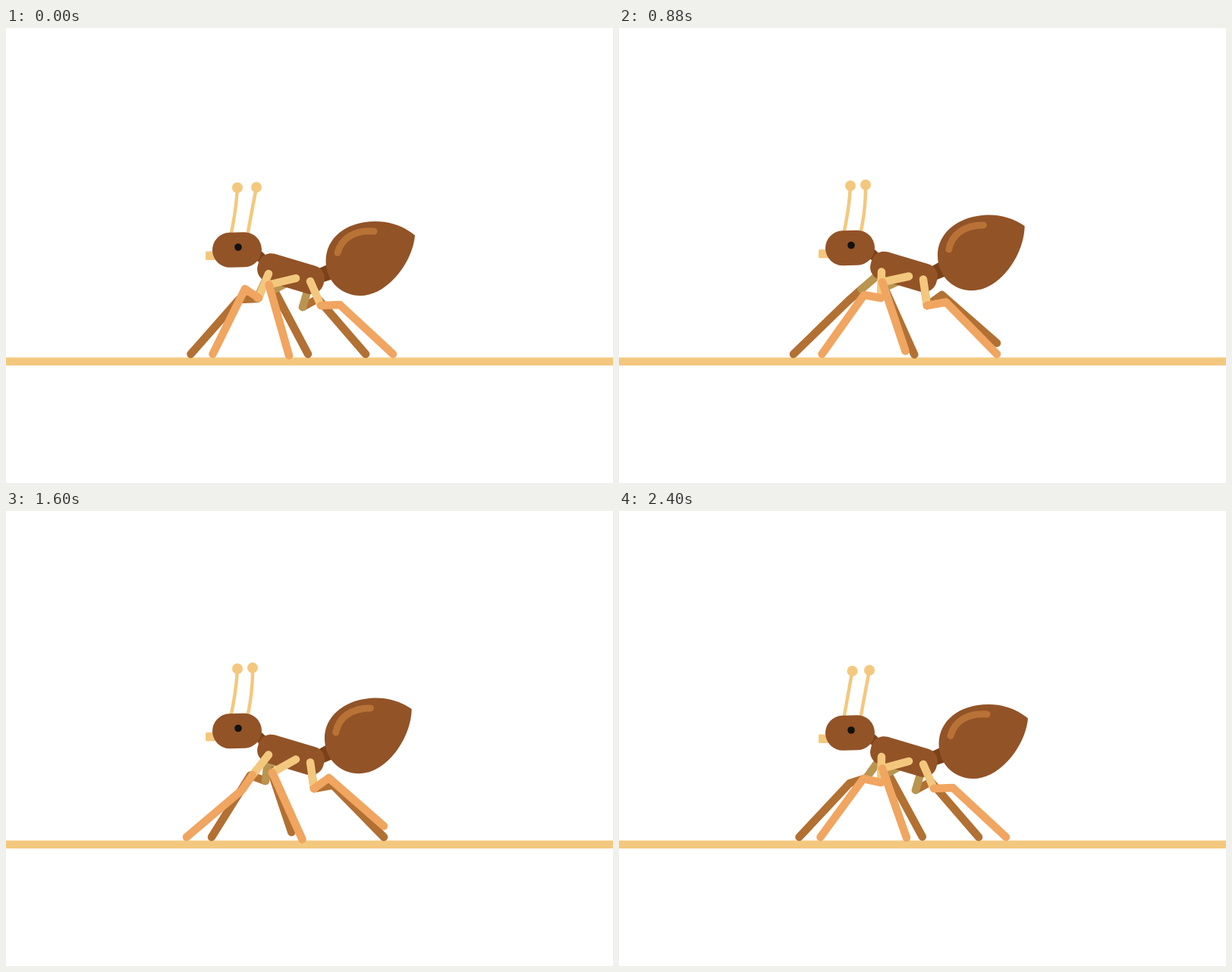
These frames come from a looping animation (800x600 px, 2440 ms). An HTML page:

```html
<!DOCTYPE html>
<html lang="en">
<head>
<meta charset="utf-8">
<title>Walking ant</title>
<style>
  html, body { margin: 0; width: 100%; height: 100%; overflow: hidden; background: #fff; }
  svg { display: block; width: 800px; height: 600px; }
  .limb { fill: none; stroke-width: 10.5; stroke-linecap: round; stroke-linejoin: round; }
  .feeler { fill: none; stroke: #f3c87e; stroke-width: 4.5; }
</style>
</head>
<body>
<svg viewBox="0 0 800 600">
  <rect y="434.5" width="800" height="10.5" fill="#f3c87e"/>
  <g id="far"></g>
  <g id="body">
    <path d="M329 296 L346 312" stroke="#7a4218" stroke-width="13"/>
    <g id="tail">
      <path d="M404 321 L432 308 L434 330 L409 338Z" fill="#7a4218"/>
      <path d="M539 273.5C527 263 508 255 487 255C448 255 421.5 277 421.5 307C421.5 334 442 353 467 353C500 353 535 313 539 273.5Z" fill="#925327"/>
      <path class="limb" d="M437 296.5C442 277 460 266 485 268" stroke="#b97236" style="stroke-width:9"/>
    </g>
    <rect x="330.5" y="305" width="90" height="38" rx="17" fill="#925327" transform="rotate(16.5 375.5 324)"/>
    <rect x="263" y="294.5" width="14" height="11.5" rx="1.5" fill="#f3c87e"/>
    <g id="feelers"></g>
    <rect x="272" y="269.5" width="65" height="46" rx="23" fill="#925327" transform="rotate(-1.5 304.5 292.5)"/>
    <circle cx="306" cy="289" r="4.8" fill="#111"/>
  </g>
  <g id="near"></g>
</svg>
<script>
const LOOP = 2440, STEP = 40, CYCLE = 12;
const PHASES = [0, 4, 6, 10];   // steps of the walk cycle at which poses are given
const FRONT = [346, 324], MID = [382, 330], HIND = [401, 334];

// Each pose lists the joints after the hip as x, y pairs.
const midWalk = [
  [347, 339.5, 379, 431], [351, 345, 390.5, 433],
  [355.5, 348, 401, 432], [347, 335, 377.5, 426]
];
const hindWalk = [
  [415, 366, 440, 365, 510, 430], [406, 366, 425.5, 352, 498, 415.5],
  [391, 368, 411, 357, 474, 430], [406, 366, 431, 361.5, 498, 430]
];
const frontNear = [
  [345, 358, 322, 353, 265.5, 430], [325, 348, 311, 368, 238, 430],
  [331, 355, 312, 362, 244, 430], [345, 356, 323, 352, 267.5, 430]
];
const frontFar = [
  [326, 352, 304, 359, 237.5, 430], [342, 356, 322, 348.5, 271, 430],
  [342, 355, 321, 350, 269, 430], [319.5, 344.5, 301, 361, 230, 430]
];

const $ = id => document.getElementById(id);
function add(parent, tag, attrs) {
  const el = document.createElementNS('http://www.w3.org/2000/svg', tag);
  for (const k in attrs) el.setAttribute(k, attrs[k]);
  return parent.appendChild(el);
}
const mix = (a, b, w) => a.map((v, i) => v + (b[i] - v) * w);

// Periodic cubic through the four poses.
function walk(poses, step) {
  const p = step % CYCLE;
  const i = p < 4 ? 0 : p < 6 ? 1 : p < 10 ? 2 : 3;
  const gap = i % 2 ? 2 : 4, u = (p - PHASES[i]) / gap;
  const [a, b, c, d] = [3, 0, 1, 2].map(k => poses[(i + k) % 4]);
  return b.map((v, k) => {
    const m0 = (c[k] - a[k]) / 6 * gap, m1 = (d[k] - v) / 6 * gap;
    return v + m0 * u + (3 * (c[k] - v) - 2 * m0 - m1) * u * u
      + (2 * (v - c[k]) + m0 + m1) * u * u * u;
  });
}

// start: pose the leg sets off from when the loop begins
function leg(side, hip, poses, { shift = 0, dx = 0, dy = 0, start } = {}) {
  const near = side === 'near', g = $(side);
  const limb = color => add(g, 'path', { class: 'limb', stroke: color });
  let thigh, shin;
  if (near) {
    thigh = limb('#f3c87e');
    shin = limb('#f0a560');
  } else {
    shin = limb('#b27033');
    thigh = limb('#b99550');
  }
  return (step, lift, settle) => {
    let pts = walk(poses, step + shift).map((v, i) => v + (i % 2 ? dy : dx));
    if (start) pts = mix(pts, start, settle);
    thigh.setAttribute('d', `M${hip[0]} ${hip[1] + lift}L${pts[0]} ${pts[1]}`);
    shin.setAttribute('d', 'M' + pts.join(' '));
  };
}

function feeler(rest, bent) {
  const line = add($('feelers'), 'path', { class: 'feeler' });
  const knob = add($('feelers'), 'circle', { r: 7, fill: '#f3c87e' });
  return bend => {
    const [x, y, cx, cy, tx, ty] = mix(rest, bent, bend);
    line.setAttribute('d', `M${x} ${y}Q${cx} ${cy} ${tx} ${ty}`);
    knob.setAttribute('cx', tx);
    knob.setAttribute('cy', ty);
  };
}

const legs = [
  leg('far', HIND, hindWalk, { shift: 6 }),
  leg('far', MID, midWalk, { shift: 6, dx: -1.2, dy: -2.4, start: [353, 345, 398, 430] }),
  leg('far', FRONT, frontFar, { start: [331, 357, 307, 358, 243.5, 430] }),
  leg('near', FRONT, frontNear, { start: [333, 356, 315, 344, 272.5, 430] }),
  leg('near', HIND, hindWalk),
  leg('near', MID, midWalk, { start: [346.5, 338.5, 373, 432] })
];
const left = feeler([296.5, 272, 302, 241, 307.5, 211], [296.5, 272, 303.5, 240, 305, 210.5]);
const right = feeler([318.5, 272, 324, 241, 330, 210], [318.5, 272, 325.5, 240, 325, 209.3]);

function draw() {
  const step = Math.floor(performance.now() % LOOP / STEP);
  const bob = (1 - Math.cos(step * Math.PI / 3)) / 1.5;
  const lift = -2.5 * bob;
  const settle = Math.max(0, 1 - step / 3);
  $('body').setAttribute('transform', `translate(0 ${lift})`);
  $('tail').setAttribute('transform', `rotate(${-4.4 * bob} 410 325)`);
  left(bob + (1 - bob) * settle);
  right(bob);
  for (const move of legs) move(step, lift, settle);
  requestAnimationFrame(draw);
}
draw();
</script>
</body>
</html>
```
